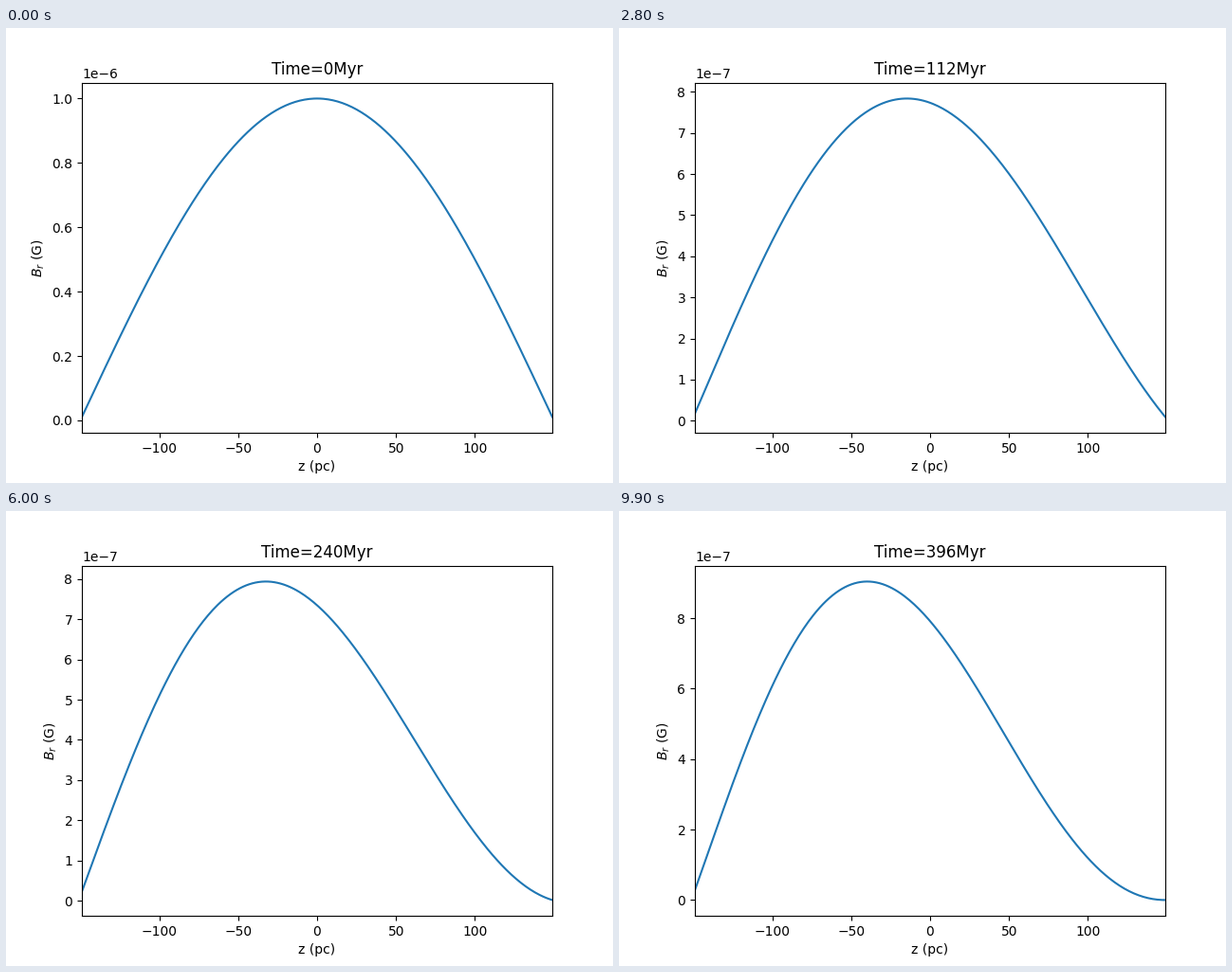
A matplotlib script for the animation above (10 s loop, 640 by 480 pixels).

```python
import numpy as np
import matplotlib.pyplot as plt
from matplotlib.animation import FuncAnimation

FRAMES, INTERVAL = 100, 100
MYR_PER_FRAME = 4
H = 150  # half thickness of the disc in pc

z = np.linspace(1 - H, H - 1, 2 * H - 1)


def rise(t, half):
    """Quadratic onset that saturates at 1 and passes 1/2 at t = half."""
    return t**2 / (t**2 + half**2)


def radial_field(t):
    """B_r in gauss across the disc after t Myr."""
    # The seed field decays, then slowly grows again
    strength = 6.65 + 3.35 * np.exp(-0.0109 * t) + 7.8 * (t / 1000)**2
    # The zero of the field settles slightly outside the disc
    x = z / (H + 1.2 * (1 - np.exp(-t / 80)))
    # A cosine at first; the odd terms then push the peak to negative z
    even = 1 - (0.234 + 0.205 * rise(t, 87)) * x**2 + 0.019 * x**4
    odd = 0.8 * rise(t, 400) * x**3 - 1.307 * rise(t, 218) * x
    return 1e-7 * strength * (1 - x**2) * (even + odd)


fig, ax = plt.subplots(figsize=(6.4, 4.8), dpi=100)
line, = ax.plot(z, radial_field(0))
ax.set_xlim(z[0], z[-1])
ax.set_xlabel("z (pc)")
ax.set_ylabel("$B_r$ (G)")


def update(i):
    t = i * MYR_PER_FRAME
    b = radial_field(t)
    pad = 0.05 * np.ptp(b)
    line.set_ydata(b)
    ax.set_ylim(b.min() - pad, b.max() + pad)
    ax.set_title(f"Time={t}Myr")
    return line,


anim = FuncAnimation(fig, update, frames=FRAMES, interval=INTERVAL,
                     init_func=lambda: update(0), repeat=True, repeat_delay=0)
plt.show()
```
